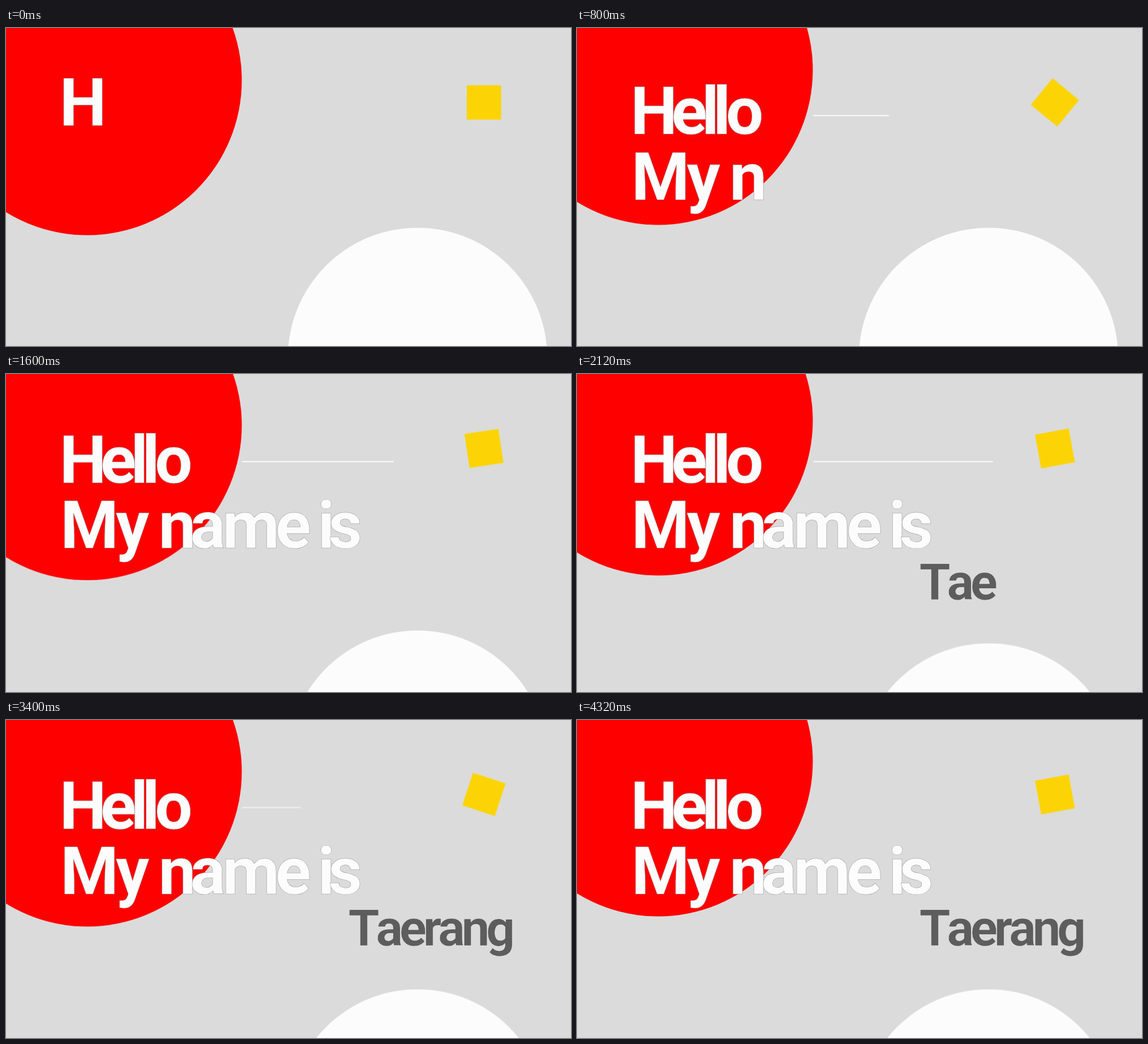
An HTML page for the animation above (4.36 s loop, 998 px wide and 561 px high).

```html
<!DOCTYPE html>
<html lang="en">
<head>
<meta charset="utf-8">
<title>Hello</title>
<style>
  html, body { margin: 0; width: 100%; height: 100%; overflow: hidden; background: #dbdbdb; }
  svg { display: block; width: 998px; height: 561px; }
  svg * { animation: 4360ms linear infinite; }

  .red { fill: #fe0000; animation-name: bob; }
  .white { fill: #fcfcfc; animation-name: sink; }
  .square { fill: #fcd405; transform-origin: 844.2px 131.3px; animation-name: spin; }
  .line { fill: #fcfcfc; transform-origin: 417.3px 154.5px; animation-name: stretch; }
  .title { animation-name: settle; }

  text { font-family: Roboto, "Liberation Sans", sans-serif; font-weight: 700; font-kerning: none; white-space: pre; }
  .title text { font-size: 117.5px; fill: #fcfcfc; stroke: #8a8a8a; stroke-width: .5px; }
  .name { font-size: 89.3px; letter-spacing: -6.4px; fill: #5d5d5d; stroke: #eee; stroke-width: .6px; }
  tspan { animation-timing-function: step-end; }

  @keyframes bob {
    0%, 38.44%, 76.88% { transform: translateY(0); }
    19.22%, 57.66%, 96.1%, 100% { transform: translateY(-19px); }
  }
  @keyframes sink {
    0%, 25.7% { transform: translateY(0); }
    39.2%, 100% { transform: translateY(122.6px); }
  }
  @keyframes spin {
    0% { transform: rotate(0deg); }
    18.35% { transform: rotate(129.2deg); }
    36.7% { transform: rotate(261.3deg); }
    48.62% { transform: rotate(349.4deg); }
    60.55% { transform: rotate(435deg); }
    77.98% { transform: rotate(558deg); }
    99.08% { transform: rotate(709.4deg); }
    100% { transform: rotate(716deg); }
  }
  @keyframes stretch {
    0% { transform: scale(0, 1); }
    46.1% { transform: scale(1, 1); }
    92.2%, 100% { transform: scale(0, .4); }
  }
  @keyframes settle {
    0% { transform: translateY(-19.3px); }
    23.85%, 100% { transform: translateY(0); }
  }
</style>
</head>
<body>
<svg viewBox="0 0 998 561">
  <circle class="red" cx="143.3" cy="92.3" r="273.2"/>
  <circle class="white" cx="726.9" cy="581.4" r="229"/>
  <rect class="square" x="813.9" y="101" width="60.6" height="60.6"/>
  <rect class="line" x="417.3" y="153.5" width="336" height="2"/>
  <g class="title">
    <text id="hello" y="191.5"></text>
    <text id="intro" y="307"></text>
  </g>
  <text id="name" class="name" x="604.5" y="397.5"></text>
</svg>
<script>
  const LOOP = 4360;
  const sheet = document.createElement('style');
  document.head.append(sheet);

  // Reveals a line letter by letter; xs holds optional letter positions.
  function type(id, str, start, step, xs = []) {
    const line = document.getElementById(id);
    [...str].forEach((ch, i) => {
      const span = document.createElementNS('http://www.w3.org/2000/svg', 'tspan');
      const key = id + i;
      const at = (start + i * step) / LOOP * 100;
      span.textContent = ch;
      if (xs[i] !== undefined) span.setAttribute('x', xs[i]);
      span.style.animationName = key;
      line.append(span);
      sheet.textContent += `@keyframes ${key} {
        0% { visibility: hidden; }
        ${at.toFixed(3)}%, 100% { visibility: visible; }
      }\n`;
    });
  }

  type('hello', 'Hello', 0, 84, [94.6, 166.4, 219.9, 240.2, 263]);
  type('intro', 'My name is', 504, 84,
    [96, 193.9, 250, 269.5, 325, 381.7, 475.4, 530, 550, 569]);
  type('name', 'Taerang', 1800, 120);
</script>
</body>
</html>
```
